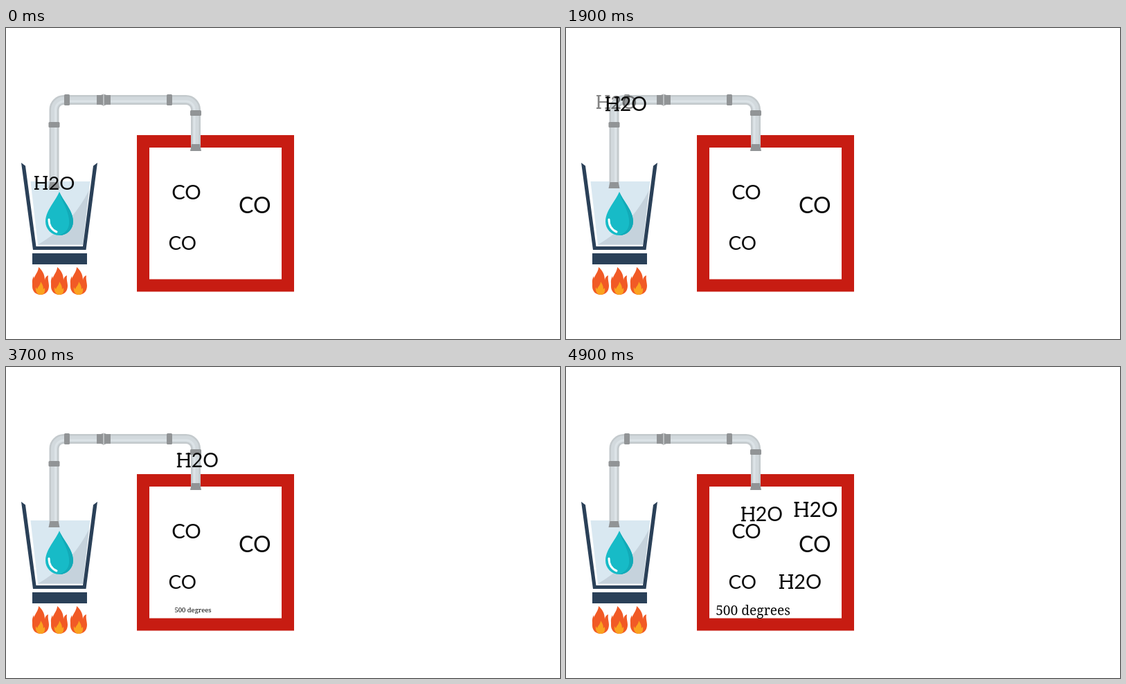
These frames come from a looping animation (800x450 px, 5 s). An HTML page:

```html
<!DOCTYPE html>
<html lang="en">
<head>
<meta charset="utf-8">
<title>Steam and carbon monoxide</title>
<style>
  html, body { margin: 0; width: 100%; height: 100%; overflow: hidden; background: #fff; }
  svg { display: block; width: 100vw; height: 100vh; }
  text { font-family: Lato, "Open Sans", sans-serif; fill: #0a0a0a; }
  .slab { font-family: "Noto Serif", serif; }
  .co { text-anchor: middle; }
</style>
</head>
<body>
<svg viewBox="0 0 800 450">
  <defs>
    <g id="flame">
      <path fill="#f15a26" d="M9 0C9 6 4 11 2 17C0 21 0 24 0 28C0 35 5 40 12 40C19 40 24 35 24 27C24 22 22 18 23 12C20 13 18 16 18 19C18 10 14 4 9 0Z"/>
      <path fill="#f15a26" d="M2 13C0 17-1 22 1 27L6 21C3 19 2 16 2 13Z"/>
      <path fill="#faa21f" d="M12 21C12 26 8 28 7 32L5 29C4 35 7 40 12 40C17 40 19 36 18 30L16 32C16 27 14 24 12 21Z"/>
    </g>
    <!-- One-unit-per-em formula with slab feet on the H; origin is left edge, mid height -->
    <g id="water">
      <text x="-3" y="36" font-size="100">H2O</text>
      <path d="M0-33H24M45-33H69M0 32.5H24M45 32.5H69" stroke="#0a0a0a" stroke-width="7"/>
    </g>
  </defs>

  <rect width="800" height="450" fill="#fff"/>
  <rect x="198" y="164" width="209" height="208.5" fill="#fff" stroke="#c71c12" stroke-width="18"/>

  <g id="glass">
    <path fill="#d9e8f1" d="M35.500 222H121.500L111 313.500H46Z"/>
    <path fill="#c5d2dc" d="M119.800 235L111 313.500H46Q94 286 119.800 235Z"/>
    <path fill="#2a4058" d="M22 195L28 199.500L43.500 316H111L126 199.500L132 195L115.500 321H39Z"/>
    <rect x="38" y="326" width="79" height="16" fill="#2a4058"/>
  </g>

  <g fill="none">
    <path id="pipe" d="M69.500 230V118A14 14 0 0 1 83.500 104H260A14 14 0 0 1 274 118V175" stroke="#c4cacd" stroke-width="14"/>
    <use href="#pipe" id="pipeMid"/>
    <path d="M69.500 230V118A14 14 0 0 1 83.500 104H260A14 14 0 0 1 274 118V175" stroke="#d2d9dd" stroke-width="9"/>
    <path d="M71.500 230V118A12 12 0 0 1 83.500 106H260A12 12 0 0 1 272 118V175" stroke="#dce3e7" stroke-width="3"/>
  </g>
  <g id="collars" fill="#919496">
    <path d="M63.500 223H75.500L77.500 232H61.500ZM268 168H280L282 178H266Z"/>
    <path d="M131 97H137L140 96V112L137 111H131ZM151 97H145L142 96V112L145 111H151Z"/>
    <path d="M141 95.500V113" stroke="#b4b7b9" stroke-width="1.500"/>
  </g>

  <path fill="#17bbc7" d="M77 237C72 250 57 264 57 280A20 20 0 0 0 97 280C97 264 82 250 77 237Z"/>
  <path fill="#12aab7" d="M77 237C82 250 97 264 97 280A20 20 0 0 1 77 300C88 296 92 288 91 278C90 263 80 250 77 237Z"/>
  <path d="M62 277C62 286 66 292 73 295" fill="none" stroke="#fff" stroke-width="3" stroke-linecap="round"/>

  <use href="#flame" x="38" y="346"/>
  <use href="#flame" x="65" y="346"/>
  <use href="#flame" x="93" y="346"/>

  <text class="co" x="260.500" y="247.500" font-size="29.300">CO</text>
  <text class="co" x="359.300" y="268" font-size="32">CO</text>
  <text class="co" x="254.800" y="321" font-size="27.800">CO</text>

  <use id="rise" href="#water"/>
  <use id="move" href="#water"/>
  <use id="low" href="#water"/>
  <use id="high" href="#water"/>
  <g id="heat"><text class="slab" y="7" font-size="19.200" text-anchor="middle">500 degrees</text></g>
</svg>
<script>
const LOOP = 5000, STEP = 100, EM_WIDTH = 204;
const el = id => document.getElementById(id);

function addCollar(x, y, w, h) {
  const r = document.createElementNS("http://www.w3.org/2000/svg", "rect");
  Object.entries({ x, y, width: w, height: h, rx: 1.5 }).forEach(([k, v]) => r.setAttribute(k, v));
  el("collars").append(r);
}
addCollar(84, 96, 8, 16);
addCollar(232, 96, 8, 16);
addCollar(61.5, 136, 16, 8);
addCollar(266, 119, 16, 8);
el("pipeMid").remove();

// Keys are [time, x, y]: left edge and vertical middle of the label.
const risePath = [[0, 41, 224], [600, 42, 185], [1100, 43, 145.500], [1200, 43.2, 137], [1650, 44, 107]];
const movePath = [
  [1900, 57, 110], [2100, 94, 110], [2400, 170, 109.500], [2600, 216, 110], [2800, 245, 110],
  [3300, 245, 110], [3600, 246, 123], [4100, 250.500, 183], [4200, 251, 189], [4800, 253, 213]
];

function along(keys, t) {
  if (t <= keys[0][0]) return keys[0].slice(1);
  for (let i = 1; i < keys.length; i++) {
    const [t0, x0, y0] = keys[i - 1], [t1, x1, y1] = keys[i];
    if (t <= t1) {
      const p = (t - t0) / (t1 - t0);
      return [x0 + (x1 - x0) * p, y0 + (y1 - y0) * p];
    }
  }
  return keys[keys.length - 1].slice(1);
}

// Grows from nothing, overshoots by a tenth and settles.
function pop(t, start) {
  const p = Math.min(1, Math.max(0, (t - start) / 800)) - 1;
  return 1 + 2.70158 * p ** 3 + 1.70158 * p ** 2;
}

function place(id, x, y, scale, opacity = 1) {
  const node = el(id), shown = scale > 0.001 && opacity > 0;
  node.setAttribute("visibility", shown ? "visible" : "hidden");
  node.setAttribute("opacity", opacity);
  node.setAttribute("transform", `translate(${x} ${y}) scale(${scale})`);
}

function label(id, x, y, width, opacity) {
  place(id, x, y, width / EM_WIDTH, opacity);
}

function popLabel(id, cx, cy, width, scale) {
  label(id, cx - width * scale / 2, cy, width * scale);
}

function draw(t) {
  label("rise", ...along(risePath, t), 56.5, t < 1900 ? 1 : t < 2000 ? 0.5 : 0);
  label("move", ...along(movePath, t), 58, t < 1900 ? 0 : 1);
  place("heat", 270, 352, pop(t, 3600));
  popLabel("low", 337.5, 310.5, 59, pop(t, 4070));
  popLabel("high", 360, 206, 58.5, pop(t, 4250));
}

const begin = performance.now();
function tick() {
  const t = (performance.now() - begin) % LOOP;
  draw(Math.floor(t / STEP) * STEP);
  requestAnimationFrame(tick);
}
draw(0);
requestAnimationFrame(tick);
</script>
</body>
</html>
```
